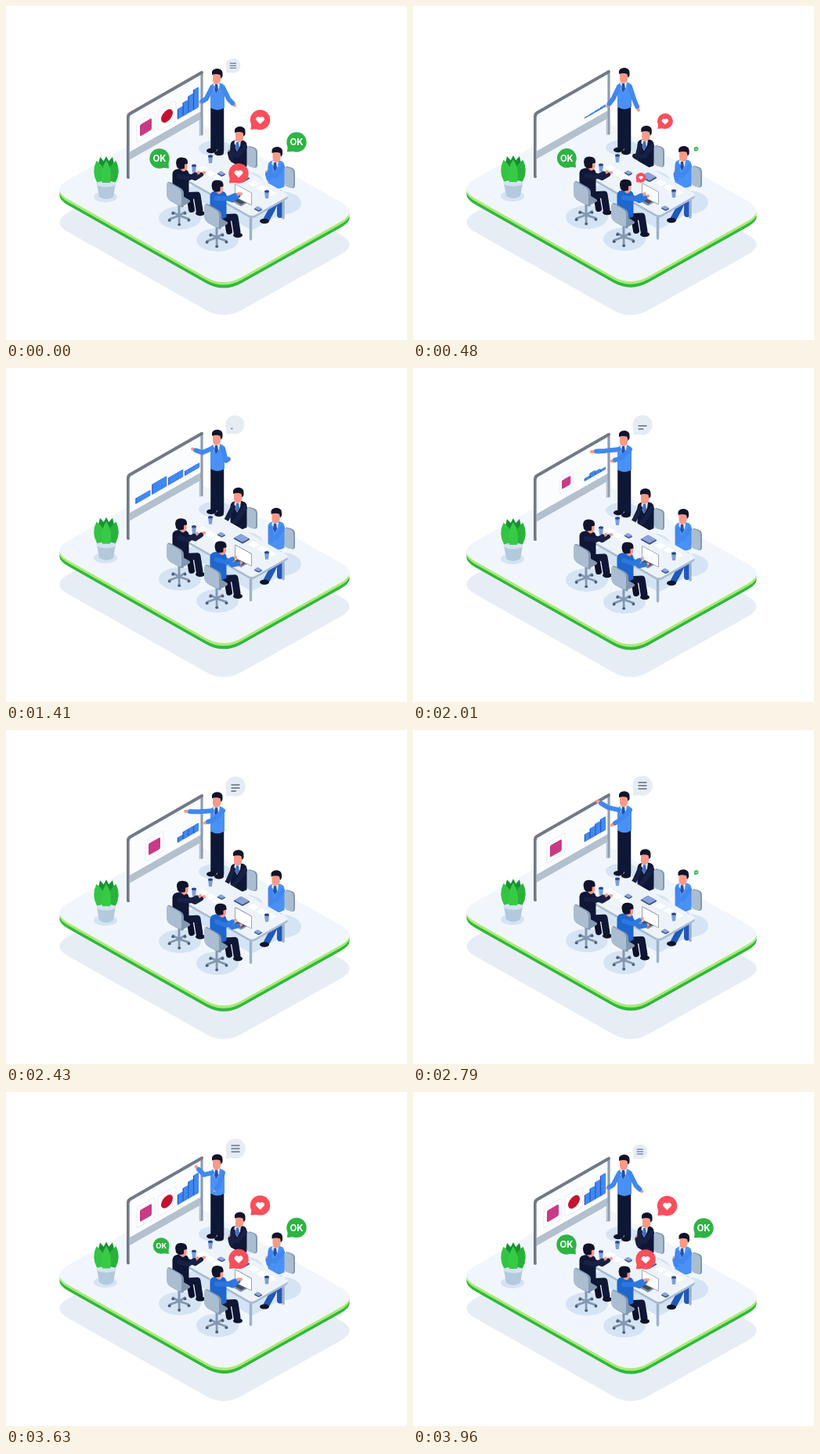
An HTML page that plays this animation: 512x427 px, repeating every 3.99 s.

```html
<!DOCTYPE html>
<html lang="en">
<head>
<meta charset="utf-8">
<title>Team meeting</title>
<style>
  html, body { margin: 0; height: 100%; overflow: hidden; background: #fff; }
  svg { display: block; width: 100vw; height: 100vh; }
  .ok { font: 700 11.5px Inter, "Open Sans", sans-serif; fill: #fff; text-anchor: middle; }
  .line { fill: none; stroke-linecap: round; stroke-linejoin: round; }
</style>
</head>
<body>
<svg id="stage" viewBox="0 0 512 427"></svg>
<script>
const LOOP = 3990, STEP = 30, SPLIT = 760, SLOPE = 0.574;
const NAVY = '#0f1736', SLEEVE = '#182044', HAIR = '#10142a', SKIN = '#f79a88';
const BLUE = '#4a91f6', BLUE_SLEEVE = '#4088ee', ROYAL = '#1f66cd', ROYAL_SLEEVE = '#2d78e0';
const STEEL = '#8298b0', STEEL_LIGHT = '#abbed1', SHADE = '#d5e4f4';

// ---- drawing helpers ----
const shape = (d, fill) => `<path d="${d}" fill="${fill}"/>`;
const line = (d, stroke, width) => `<path class="line" d="${d}" stroke="${stroke}" stroke-width="${width}"/>`;
const oval = (x, y, rx, ry, fill) => `<ellipse cx="${x}" cy="${y}" rx="${rx}" ry="${ry}" fill="${fill}"/>`;
const group = (x, y, body) => `<g transform="translate(${x} ${y})">${body}</g>`;
const repeat = (n, draw) => Array.from({ length: n }, (_, i) => draw(i)).join('');

// Polygon with softened corners
function rounded(pts, radius) {
  return pts.map(([x, y], i) => {
    const toward = ([px, py]) => {
      const k = radius / Math.hypot(px - x, py - y);
      return `${x + (px - x) * k},${y + (py - y) * k}`;
    };
    return `${i ? 'L' : 'M'}${toward(pts.at(i - 1))}Q${x},${y} ${toward(pts[(i + 1) % pts.length])}`;
  }).join('') + 'Z';
}

// Flat rectangle lying on the floor plane, a and b are half sides
const tile = (x, y, a, b, radius, fill) => shape(rounded([[a, b], [a, -b], [-a, -b], [-a, b]]
  .map(([p, q]) => [x + p + q, y + (p - q) * SLOPE]), radius), fill);
// Upright panel whose long edge recedes to the right and down
const panel = (x, y, w, h, fill, slope = SLOPE) =>
  shape(rounded([[x, y], [x + w, y + w * slope], [x + w, y + h + w * slope], [x, y + h]], 5), fill);

// ---- room ----
const SLAB = rounded([[57, 233.5], [228, 137], [450, 262], [278, 358.5]], 26);
const slab = (dy, fill) => group(0, dy, shape(SLAB, fill));

const leaf = (x, y, w, h, turn, fill) => `<g transform="translate(${x} ${y}) rotate(${turn})">` +
  shape(`M0,${-h}Q${w},${-h * 0.55} ${w * 0.6},0H${-w * 0.6}Q${-w},${-h * 0.55} 0,${-h}Z`, fill) + '</g>';
const plant =
  shape('M116,226L119,243Q128,249 137,243L140,226Z', '#b3c9de') + oval(128, 226, 12.5, 4.5, '#d3e2f0') +
  repeat(3, i => leaf(128, 222, 9, 31, 15 * (i - 1), '#178f33')) +
  repeat(2, i => leaf(122 + 12 * i, 223, 10, 27, 28 * i - 14, i ? '#28b23a' : '#34c443')) +
  leaf(128, 225, 8.5, 29, 0, '#37cb45');

const board =
  shape('M158,138L251,84.500V139L158,190Z', '#fafcfe') +
  shape('M158,185.500L250,133V143L158,195.500Z', '#b3c0cd') +
  line('M250,86V163', '#8f9cab', 3.2) + line('M247.700,142V164', '#b3c0cd', 2) +
  line('M156,218V141Q156,138 158.500,136.500L250,84', '#717987', 4) + line('M157.500,142V217', '#a0abb8', 1);

const cup = (x, y) => shape(`M${x - 3},${y - 4}L${x - 2},${y + 5}H${x + 2}L${x + 3},${y - 4}Z`, '#7f9fd4') +
  oval(x, y - 4, 3, 1.7, '#2b4687');
const gadget = (x, y, a, b) => tile(x, y + 0.8, a, b, 1.5, '#3d5083') + tile(x, y - 0.3, a * 0.85, b * 0.85, 1, '#8aa3da');
const paper = (x, y) => tile(x, y, 4, 3.6, 0.5, '#fff');

const table =
  line('M312.500,268V297M354,246V270', '#9db2c8', 3.4) +
  tile(294, 232.5, 44, 24, 5, '#a9bccf') + tile(294, 229.5, 44, 24, 5, '#edf3f9') +
  repeat(3, i => paper(252 + 9 * i, 207 + 6 * i) + paper(316 + 11 * i, 226 + 6 * i)) +
  gadget(275, 213, 3.2, 2.6) + gadget(322, 258, 3.2, 2.6) + gadget(301, 218, 6, 5) +
  cup(261, 195) + cup(240, 207) + cup(333, 240) +
  tile(299, 249, 6, 5, 1, '#8391a5') + tile(299, 248.5, 4.5, 3, 0.5, '#454c5b') +
  line('M293,227L313,238V253L293,243Z', '#76869b', 1.4) + shape('M293,227L313,238V253L293,243Z', '#fff');

// ---- people ----
const torso = (x, y, w, h, fill) => shape(
  `M${x - w / 2},${y + h}V${y + 7}Q${x - w / 2},${y} ${x},${y}Q${x + w / 2},${y} ${x + w / 2},${y + 7}V${y + h}Q${x},${y + h + 6} ${x - w / 2},${y + h}Z`, fill);
const collar = (x, y, shirt, tie) =>
  shape(`M${x - 5},${y}H${x + 3}L${x + 2},${y + 7}L${x - 2},${y + 14}L${x - 6},${y + 6}Z`, shirt) +
  shape(`M${x - 3},${y + 2}H${x}L${x + 1},${y + 9}L${x - 2},${y + 14}L${x - 4},${y + 9}Z`, tie);
const frontHead = (id, x, y) => group(x, y, `<g id="${id}Head">` +
  shape('M-5.500,6H4.500V15Q4,19 -.5,20Q-5,20 -5.500,15Z', SKIN) +
  shape('M-6.500,8V4Q-5,0 1,0Q7,1 7,6V10L5,13L4,8Q-1,6 -6.500,8Z', HAIR) + '</g>');
const backHead = (id, x, y) => group(x, y, `<g id="${id}Head">` +
  shape('M0,6H7.500V13Q6,18 2,18L-2,15Z', SKIN) +
  shape('M-7,7Q-7,0 0,0Q8,0 8,6V8L4,9V14Q-3,17 -6,12Z', HAIR) + '</g>');
const arm = (id, sleeve) => `<g id="${id}">${line('', SKIN, 4)}${line('', sleeve, 6)}</g>`;
const shoe = (x, y) => oval(x, y, 6, 3.2, HAIR);

const presenter =
  line('M265.500,130V181M274,130V184', NAVY, 8.5) + shoe(262, 184) + shoe(272, 187) +
  torso(270, 97, 18, 32, BLUE) + collar(270, 97, '#e8f0fb', '#2350ae') + frontHead('pres', 269.5, 79) +
  arm('presL', BLUE_SLEEVE) + arm('presR', BLUE_SLEEVE);

const farChair = panel(308, 177, 13, 26, STEEL, 0.3) + panel(307, 178, 12, 25, STEEL_LIGHT, 0.3);
const farMan = (id, suit, sleeve, tie) => farChair +
  torso(297, 170, 21, 34, suit) + collar(297, 171, '#e3edfb', tie) + frontHead(id, 297.5, 153) +
  arm(id + 'R', sleeve) + arm(id + 'L', sleeve);

const spoke = i => {
  const a = i * Math.PI * 0.4 + 0.3, x = 221 + 13 * Math.cos(a), y = 269 + 8 * Math.sin(a);
  return line(`M221,267L${x},${y}`, STEEL, 2.8) + oval(x, y + 1.5, 2, 1.8, '#4c5d74');
};
const nearChair = repeat(5, spoke) + line('M221,253V267', STEEL, 3) +
  tile(224, 248, 7, 6, 4, STEEL) + panel(206, 222, 21, 24, STEEL) + panel(205, 223, 19, 22, STEEL_LIGHT);
const nearMan = (id, suit, sleeve) => arm(id + 'R', sleeve) +
  line('M222,243L235,247L237,259', '#0b1029', 8) + line('M222,242L244,241L247,260', NAVY, 9) + shoe(248, 264) +
  torso(223, 207, 21, 34, suit) + backHead(id, 223, 192.5) + arm(id + 'L', sleeve) + nearChair;

// ---- speech bubbles, with the origin at the tip of the tail ----
const bubble = (id, dir, fill, inner) => `<g id="${id}">` + shape(`M0,0L${dir},-11L${dir * 11},-1Z`, fill) +
  oval(dir * 12, -12.5, 12.7, 12.7, fill) + group(dir * 12, -12.5, inner) + '</g>';
const OK = ['#2fb344', '<text class="ok" y="4.200">OK</text>'];
const HEART = ['#fb4f5b', shape('M0,5.500L-4.800,.8A2.900,2.900 0 0 1 0,-2.700A2.900,2.900 0 0 1 4.800,.8Z', '#fff')];
const REPLIES = [[359, 185.5, 1, OK], [285, 225.5, 1, HEART], [312.5, 157, 1, HEART], [208, 206.5, -1, OK]];
const notes = '<g id="notes">' + repeat(3, i => `<rect x="-5.500" y="${4 * i - 4.8}" height="1.600" fill="#66758a"/>`) + '</g>';

const card = (id, mark) => `<g id="${id}"><rect x="-11.500" y="-13" width="23" height="26" rx="3" fill="#fff" stroke="#e5ebf3"/>${mark}</g>`;
const bar = '<g><rect x="-1.200" fill="#2257b8"/><rect fill="#4088f2"/></g>';

document.getElementById('stage').innerHTML = slab(43, '#e7edf5') + '<g id="scene">' +
  slab(7.5, '#2fb83c') + slab(3.5, '#a9ea78') + slab(0, '#f1f6fc') +
  oval(127, 243, 15, 7, SHADE) + oval(267, 181, 21, 10, SHADE) + tile(294, 247, 44, 24, 5, SHADE) +
  repeat(2, i => oval(222 + 48 * i, 270 + 28 * i, 27, 15, SHADE) + oval(304 + 48 * i, 225 + 26 * i, 25, 15, SHADE)) +
  plant + board + `<g id="chart">${bar.repeat(4)}</g>` +
  card('cardA', '<rect x="-7.500" y="-7.500" width="15" height="15" rx="2" fill="#c73a86"/>') +
  card('cardB', '<circle r="7.500" fill="#c4122f"/>') +
  presenter + farMan('back', NAVY, SLEEVE, '#3d6fc4') +
  group(48, 26, line('M301,212L291,234L285,245M302,214V240', '#2058b8', 8) + shoe(282, 248) +
    farMan('side', BLUE, BLUE_SLEEVE, '#2350ae')) +
  table + nearMan('left', NAVY, SLEEVE) + group(48, 28, nearMan('front', ROYAL, ROYAL_SLEEVE)) +
  bubble('talk', 1, '#e5ecf3', notes) + REPLIES.map(([, , dir, look], i) => bubble('reply' + i, dir, ...look)).join('') + '</g>';

// ---- motion helpers ----
const $ = id => document.getElementById(id);
const place = (id, value) => $(id).setAttribute('transform', value);
const span = (u, a, b) => Math.min(1, Math.max(0, (u - a) / (b - a)));
const phase = (u, a, b) => { const p = span(u, a, b); return p * p * (3 - 2 * p); };
const lerp = (a, b, p) => a + (b - a) * p;
const blend = (a, b, p) => a.map((v, i) => lerp(v, b[i], p));
const backOut = p => 1 + 2.70158 * (p - 1) ** 3 + 1.70158 * (p - 1) ** 2;
const rise = (u, start) => u < start ? 0 : backOut(span(u, start, start + 300));
const popped = (u, start, end) => rise(u, start) * (1 - phase(u, end, end + 200));
const onBoard = (id, x, y, s) => place(id, `matrix(${s} ${-SLOPE * s} 0 ${s} ${x} ${y})`);
const popAt = (id, x, y, s) => place(id, `translate(${x} ${y}) scale(${s})`);

// The elbow hangs lower the closer the hand is to the shoulder
function reach(id, [sx, sy], [hx, hy]) {
  const ex = (sx + hx) / 2, ey = (sy + hy) / 2 + Math.max(0, 36 - Math.hypot(hx - sx, hy - sy)) * 0.45;
  const [hand, sleeve] = $(id).children;
  const cuff = blend([ex, ey], [hx, hy], 0.65);
  hand.setAttribute('d', `M${cuff}L${hx},${hy}`);
  sleeve.setAttribute('d', `M${sx},${sy}L${ex},${ey}L${cuff}`);
}

// Presenter gestures: asking, pointing, reaching up, opening both arms, arms down
const GESTURES = [[1050, 1340], [1570, 1900], [2250, 3200], [3500, 3840], [4250, 4600]];
const LEFT_HAND = [[248, 131], [238, 104], [228, 106], [240, 82], [248, 122], [248, 131]];
const RIGHT_HAND = [[286, 136], [285, 116], [254, 118], [254, 125], [292, 126], [286, 136]];
const gesture = (hands, u) => GESTURES.reduce((at, [a, b], i) => blend(at, hands[i + 1], phase(u, a, b)), hands[0]);

function drawChart(u) {
  const fold = phase(u, 1530, 1950), grow = span(u, 2080, 3230), gone = 1 - phase(u, 4260, 4520);
  const width = lerp(14 + 4 * phase(u, 900, 1200), 6, fold), gap = lerp(20.9, 6.7, fold);
  const [x0, y0] = blend([166.5, 173.5], [220, 143.3], fold);
  [...$('chart').children].forEach((el, i) => {
    const wide = 13 - 3.5 * Math.abs(i - 1) * (i ? 1 : 1.7);
    const first = wide * rise(u, i < 3 ? 910 : 790) * lerp(1, 0.5, fold);
    const h = Math.max(0, lerp(first, 13 + 4.3 * i, grow) * gone);
    el.setAttribute('transform', `matrix(1 ${-SLOPE} 0 1 ${x0 + gap * i} ${y0 - gap * SLOPE * i})`);
    for (const rect of el.children)
      Object.entries({ y: -h, width, height: h }).forEach(([k, v]) => rect.setAttribute(k, v));
  });
}

function drawTalk(u) {
  popAt('talk', 281, 84.5, phase(u, 1180, 1450) * (1 - 0.26 * phase(u, 3700, 3940)) * (1 - phase(u, 4180, 4400)));
  place('notes', `translate(0 ${10 * (1 - span(u, 1320, 2700))})`);
  [...$('notes').children].forEach((rect, i) =>
    rect.setAttribute('width', 11 * span(u, 1320 + i * 440, 1720 + i * 440)));
}

function drawPeople(u, t) {
  const wave = n => Math.sin(t / LOOP * n * 2 * Math.PI);
  reach('presL', [263, 103], gesture(LEFT_HAND, u));
  reach('presR', [277, 103], gesture(RIGHT_HAND, u));

  const cheer = phase(u, 2850, 3150) - phase(u, 4350, 4650);
  const clap = cheer * wave(12), tap = (1 - cheer) * wave(20), sway = wave(2);
  reach('backL', [290, 178], blend([275 + sway, 203], [285 - clap, 184], cheer));
  reach('backR', [305, 179], blend([285, 205], [287 + clap, 187], cheer));
  reach('sideL', [290, 178], blend([291, 188], [285 - clap, 185], cheer));
  reach('sideR', [305, 179], blend([288, 190], [287 + clap, 187], cheer));
  reach('leftL', [221, 217], [246 + 2 * sway, 212]);
  reach('leftR', [230, 215], [253, 212 + sway]);
  reach('frontL', [221, 217], blend([245, 214 + tap], [249, 211], cheer));
  reach('frontR', [230, 215], blend([252, 222 - tap], [252, 211], cheer));

  place('leftHead', `translate(${1 + sway})`);
  place('frontHead', `translate(${2.5 - 4 * cheer} 1)`);
  place('backHead', `translate(${2 * cheer - 1})`);
  place('sideHead', `translate(${cheer - 0.5})`);
}

function draw(t) {
  const u = t < SPLIT ? t + LOOP : t;
  place('scene', `translate(0 ${Math.cos(t / LOOP * 4 * Math.PI)})`);
  drawChart(u);
  onBoard('cardA', ...blend([196, 145], [178.5, 154], phase(u, 1900, 3180)), popped(u, 1945, 4250));
  onBoard('cardB', 205.5, 139.5, popped(u, 2900, 4250));
  drawTalk(u);
  drawPeople(u, t);
  REPLIES.forEach(([x, y], i) => popAt('reply' + i, x, y, popped(u, 2775 + 260 * i, 4330 + 40 * i)));
}

const begin = performance.now();
function tick() {
  const t = (performance.now() - begin) % LOOP;
  draw(Math.floor(t / STEP) * STEP);
  requestAnimationFrame(tick);
}
tick();
</script>
</body>
</html>
```
